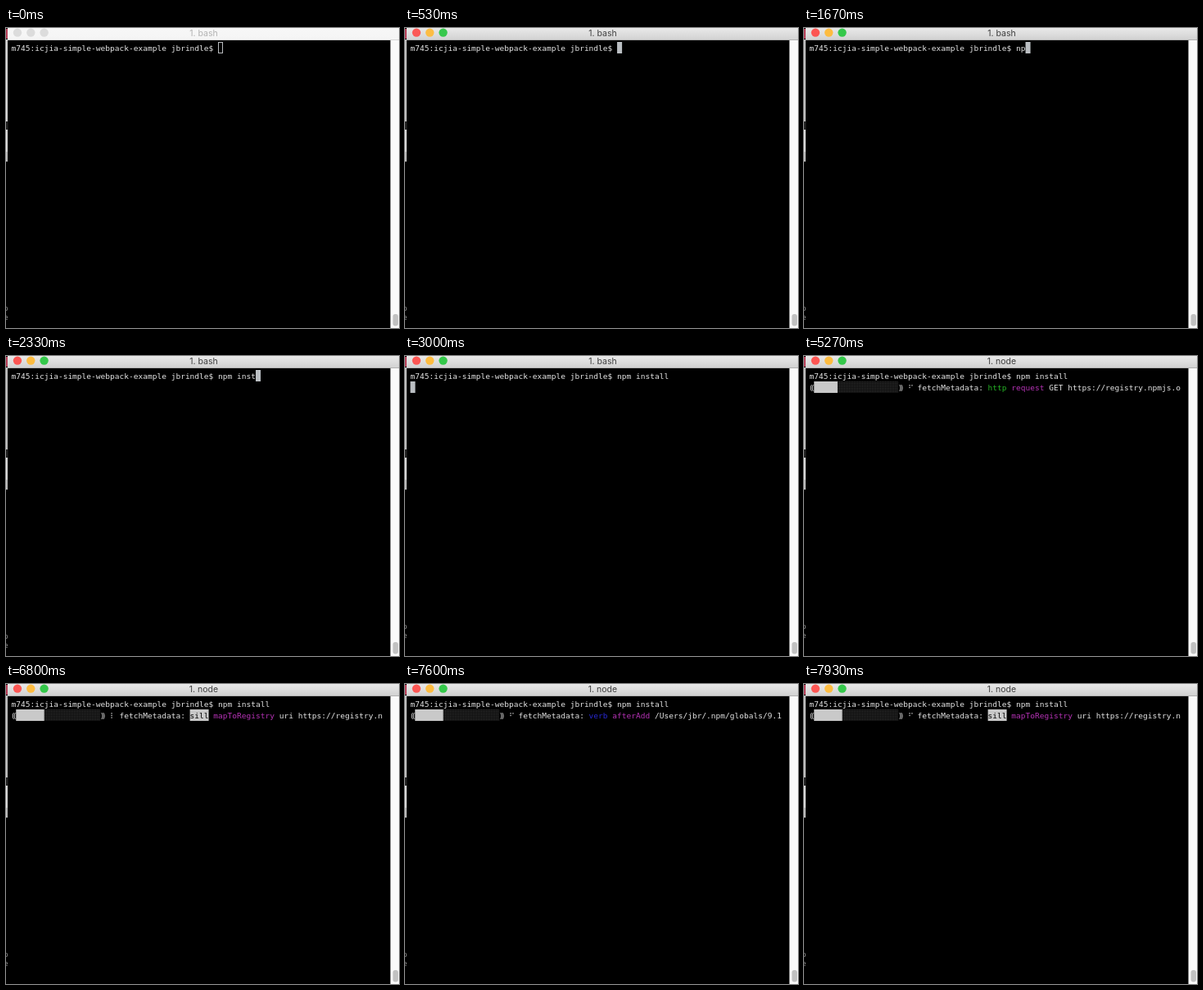
Recreate the animation shown at these times as an HTML page with a canvas. Size 480 by 366 pixels, loop 8 s.

```html
<!DOCTYPE html>
<html lang="en">
<head>
<meta charset="utf-8">
<title>Terminal</title>
<style>
html, body { margin: 0; width: 100%; height: 100%; overflow: hidden; background: #000; }
canvas { display: block; }
</style>
</head>
<body>
<canvas id="stage" width="480" height="366"></canvas>
<script>
const ctx = document.getElementById('stage').getContext('2d');
const LOOP = 8000, TICK = 1000 / 15;
const LEFT = 6.5, CELL = 5.74, TOP = 17, ROW = 14;
const WHITE = '#e4e4e4', MAGENTA = '#b532b5';
const PROMPT = 'm745:icjia-simple-webpack-example jbrindle$ ';
const COMMAND = 'npm install';

// [time, characters typed]
const TYPED = [[1530, 1], [1670, 2], [1800, 3], [1930, 4], [2070, 5], [2200, 6],
  [2330, 8], [2470, 9], [2600, 10], [2730, 11]];

// [time, task, level, prefix, message]
const LOG = [
  [4070, 'normalizeTree', 'sill', 'install', 'loadCurrentTree'],
  [4200, 'loadIdealTree', 'sill', 'install', 'loadIdealTree'],
  [4330, 'fetchMetadata', 'sill', 'mapToRegistry', 'using default registry'],
  [4470, 'fetchMetadata', 'sill', 'mapToRegistry', 'uri https://registry.npmjs.org/'],
  [4600, 'fetchMetadata', 'verb', 'request', 'uri https://registry.npmjs.org/'],
  [4730, 'fetchMetadata', 'http', 'request', 'GET https://registry.npmjs.org/'],
  [6670, 'fetchMetadata', 'verb', 'afterAdd', '/Users/jbr/.npm/globals/9.14.0'],
  [6800, 'fetchMetadata', 'sill', 'mapToRegistry', 'uri https://registry.npmjs.org/'],
  [7000, 'fetchMetadata', 'http', 'request', 'GET https://registry.npmjs.org/'],
  [7270, 'fetchMetadata', 'sill', 'mapToRegistry', 'uri https://registry.npmjs.org/'],
  [7470, 'fetchMetadata', 'verb', 'afterAdd', '/Users/jbr/.npm/globals/9.14.0'],
  [7730, 'fetchMetadata', 'sill', 'mapToRegistry', 'uri https://registry.npmjs.org/'],
];
const LEVELS = { sill: '#000', verb: '#2828d0', http: '#25b425' };

// [start, end, first spinner step, steps per tick]
const SPINS = [[4070, 4730, 7, 1], [4870, 5330, 4, 1], [5530, 6000, 1, 1], [6270, 6270, 9, 1],
  [6470, 6470, 0, 1], [6670, 7600, 6, 1], [7600, 7930, 0, 2]];
const SPINNER = '⠋⠙⠹⠸⠼⠴⠦⠧⠇⠏';

const last = (list, t) => list.filter(item => item[0] <= t).pop();
const colX = col => LEFT + col * CELL;

function rect(color, x, y, w, h) {
  ctx.fillStyle = color;
  ctx.fillRect(x, y, w, h);
}

function mix(a, b, k) {
  return `rgb(${a.map((v, i) => Math.round(v + (b[i] - v) * k))})`;
}

function write(text, col, row, color = WHITE) {
  ctx.font = '9.53px "DejaVu Sans Mono", monospace';
  ctx.textAlign = 'left';
  ctx.fillStyle = color;
  [...text].forEach((ch, i) => ctx.fillText(ch, colX(col + i), TOP + row * ROW + 10.5));
}

function cursor(col, row, hollow) {
  const x = colX(col), y = TOP + row * ROW;
  if (hollow) {
    ctx.strokeStyle = '#b9bcbf';
    ctx.lineWidth = 1;
    ctx.strokeRect(Math.round(x) + .5, y + .5, 5, 13);
  } else rect('#bbbfc3', x, y, CELL + .3, ROW);
}

function titleBar(t, active) {
  const bar = ctx.createLinearGradient(0, 0, 0, 14);
  bar.addColorStop(0, mix([247, 247, 247], [233, 233, 233], active));
  bar.addColorStop(1, mix([245, 245, 245], [210, 210, 210], active));
  rect(bar, 2, 0, 478, 14);
  rect(mix([214, 214, 214], [176, 176, 176], active), 2, 14, 478, 1);
  [[252, 86, 83], [253, 188, 64], [52, 200, 74]].forEach((color, i) => {
    ctx.fillStyle = mix([220, 220, 220], color, active);
    ctx.beginPath();
    ctx.arc(14 + i * 16.3, 5.6, 5.2, 0, 7);
    ctx.fill();
  });
  ctx.font = '10.5px Inter, sans-serif';
  ctx.textAlign = 'center';
  ctx.fillStyle = mix([178, 178, 178], [62, 62, 62], active);
  ctx.fillText(t < 3600 ? '1. bash' : '1. node', 241.5, 9.8);
}

// Sliver of the windows behind, plus the scroll bar
function surroundings(t, active) {
  rect('#b8415a', 0, 1, 2, 12);
  rect(mix([214, 214, 214], [190, 190, 190], active), 0, 14, 2, 100);
  rect('#222', 0, 114, 2.5, 10);
  rect('#d9d9d9', 0, 124, 2, 27);
  rect('#bcbcbc', 0, 151, 2, 12);
  const y = t < 2730 ? 345 : 333;
  ctx.font = '9.5px "DejaVu Sans Mono", monospace';
  ctx.textAlign = 'right';
  ctx.fillStyle = '#8a8a8a';
  ctx.fillText('p', 2.8, y - .5);
  ctx.fillText('e', 2.8, y + 11);
  rect('#fafafa', 469.5, 15, 10.5, 351);
  ctx.fillStyle = '#c1c1c1';
  ctx.beginPath();
  ctx.roundRect(472.5, 349, 6.5, 14.5, 3);
  ctx.fill();
}

function spinner(t) {
  const [start, end, first, rate] = last(SPINS, t);
  const step = first + rate * Math.floor((Math.min(t, end) - start) / TICK + .1);
  const bits = SPINNER.charCodeAt(step % 10) - 0x2800;
  for (let i = 0; i < 6; i++) {
    if (bits >> i & 1) rect('#d0d0d0', i < 3 ? 128.4 : 131.3, 35.2 + i % 3 * 2.6, 1.3, 1.3);
  }
}

function progress(t) {
  const [, task, level, prefix, message] = last(LOG, t);
  const filled = t < 4330 ? 0 : t < 6670 ? 5 : 6;
  const y = TOP + ROW;
  for (const shift of [-.15, .2]) {
    write('(', shift, 1);
    write(')', 19 + shift, 1);
  }
  rect('#101010', colX(1), y, 18 * CELL, ROW);
  for (let x = 13; x < 115; x += 2)
    for (let dy = 0; dy < ROW; dy += 2) rect('#333', x, y + dy, 1, 1);
  rect('#c9c9c9', colX(1), y, filled * CELL, ROW);
  spinner(t);
  write(task + ':', 23, 1);
  if (level === 'sill') rect('#c9c9c9', colX(38), y, 4 * CELL, ROW);
  write(level, 38, 1, LEVELS[level]);
  write(prefix, 43, 1, MAGENTA);
  const col = 44 + prefix.length;
  write(message.slice(0, 79 - col), col, 1);
}

function draw(t) {
  const k = Math.min(1, Math.max(0, (t - 10) / 730));
  const active = t < 70 ? 0 : 1 - (1 - k) ** 3;
  rect('#000', 0, 0, 480, 366);
  surroundings(t, active);
  titleBar(t, active);
  const typed = (last(TYPED, t) || [0, 0])[1];
  write(PROMPT + COMMAND.slice(0, typed), 0, 0);
  if (t < 3000) cursor(PROMPT.length + typed, 0, t < 70);
  else if (t < 4070) cursor(0, 1);
  else progress(t);
}

const begin = performance.now();
function frame() {
  draw((performance.now() - begin) % LOOP);
  requestAnimationFrame(frame);
}
frame();
</script>
</body>
</html>
```
